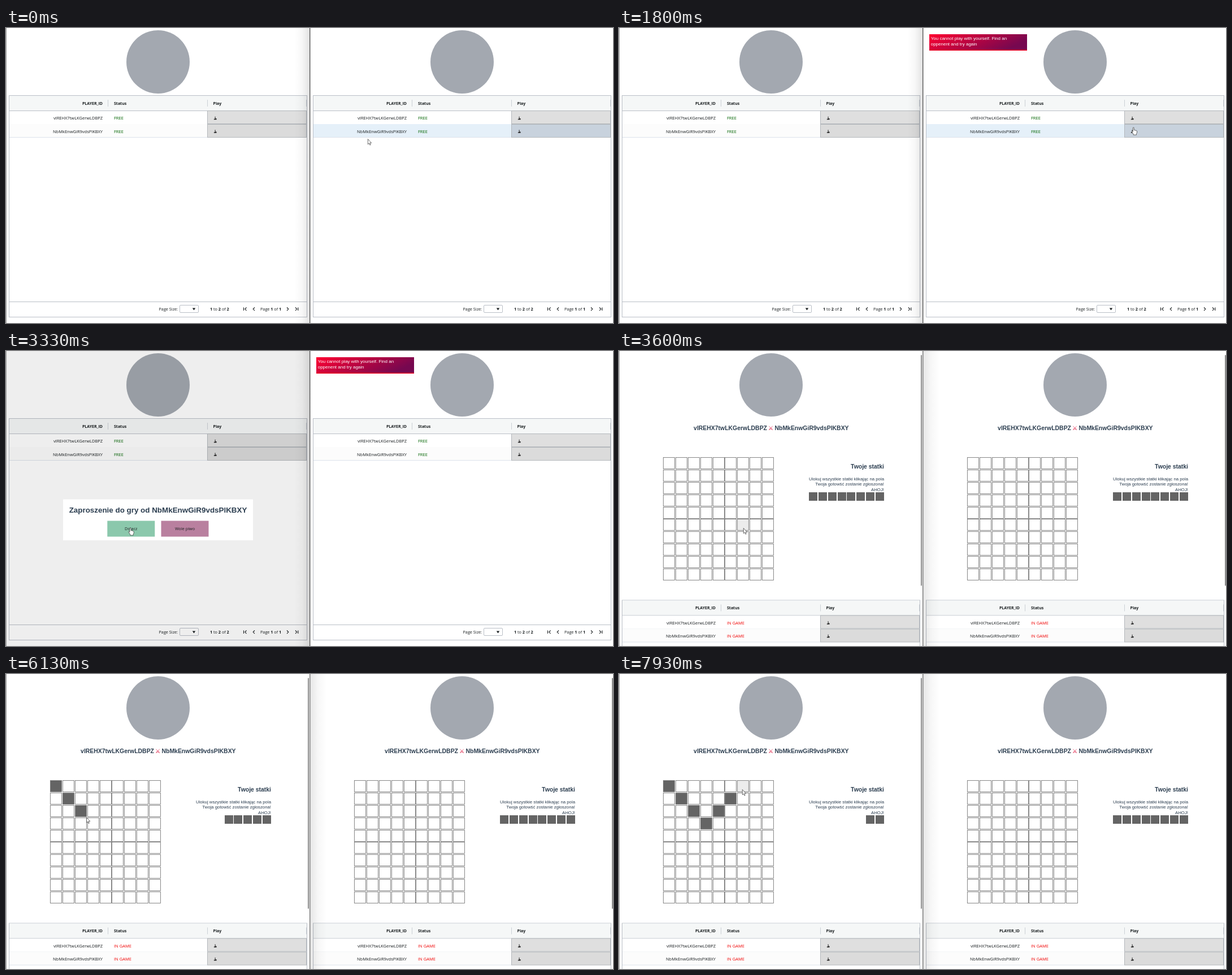
An HTML page for the animation above (8 s loop, 1074x522 px).

```html
<!DOCTYPE html>
<html lang="pl">
<head>
<meta charset="utf-8">
<title>Ships lobby</title>
<style>
html, body { margin: 0; width: 100%; height: 100%; overflow: hidden; background: #fff; }
svg { display: block; }
text { font: 7.25px "Open Sans", "Noto Sans", sans-serif; fill: #181d1f; }
text.id { font-size: 7.5px; }
text.head { font-size: 7px; font-weight: 700; }
text.note, text.toast { font: 7.8px "Liberation Sans", Arial, sans-serif; fill: #2c3e50; }
text.toast { font-size: 8px; fill: #fff; }
text.title { font: bold 10.45px "Liberation Sans", Arial, sans-serif; fill: #2c3e50; }
text.invite { font: bold 13.4px "Liberation Sans", Arial, sans-serif; fill: #2c3e50; }
text.swords { font: 10.45px "DejaVu Sans", sans-serif; fill: #dc143c; }
.end { text-anchor: end; }
.mid { text-anchor: middle; }
.bold { font-weight: 700; }
.line { fill: none; stroke: #babfc7; }
.rule { fill: none; stroke: #dde2eb; }
.icon { fill: none; stroke: #181d1f; stroke-width: 1.1; }
.cell { stroke: #777; stroke-width: .9; }
</style>
</head>
<body>
<svg id="stage" width="1074" height="522" viewBox="0 0 1074 522"></svg>
<script>
const LOOP = 8000, STEP = 1000 / 15, SHIFT = 538;
const PLAYERS = ['vlREHX7twLKGerwLDBPZ', 'NbMkEnwGiR9vdsPlKBXY'];
const COLS = 9, ROWS = 10, PITCH = 21.88, GRID_X = 78, GRID_Y = 188;
const TOAST_AT = 1200, INVITE_AT = 2130, JOIN_HOVER_AT = 3330, GAME_AT = 3600;

// column, row, time of each ship
const SHIPS = [[0, 0, 5130], [1, 1, 5600], [2, 2, 5930], [3, 3, 6460], [4, 2, 6930], [5, 1, 7530]];

// time, x, y of the pointer tip
const PATH = [
  [0, 640, 196], [400, 758, 211], [866, 910, 182], [1733, 910, 182], [1933, 911, 159],
  [2400, 911, 159], [2800, 610, 232], [3200, 206, 316], [3333, 220, 313], [3600, 220, 313],
  [4133, 274, 334], [4600, 111, 240], [4933, 92, 197], [5200, 92, 197], [5530, 109, 218],
  [5660, 110, 219], [5930, 132, 243], [6000, 132, 243], [6130, 142, 253], [6330, 149, 261],
  [6470, 150, 261], [6870, 176, 243], [7000, 177, 242], [7330, 193, 223], [7530, 196, 219],
  [7930, 218, 204], [8000, 218, 204]
];

const rect = (x, y, w, h, fill, extra = '') =>
  `<rect x="${x}" y="${y}" width="${w}" height="${h}" fill="${fill}" ${extra}/>`;
const text = (x, y, s, cls = '', extra = '') => `<text x="${x}" y="${y}" class="${cls}" ${extra}>${s}</text>`;
const path = (d, cls, extra = '') => `<path d="${d}" class="${cls}" ${extra}/>`;
const repeat = (n, f) => Array.from({ length: n }, (_, i) => f(i)).join('');

function row(i) {
  const y = 147 + i * 23, mid = 159.5 + i * 23.5;
  return rect(6, y, 350, 23, i ? '#fcfcfc' : '#fff', `class="row${i}"`) +
    path(`M6 ${y + 23.5}H356`, 'rule') +
    rect(356.5, y - .5 + i, 175, 23, i ? '#dbdbdb' : '#dfdfdf', `class="play${i}" stroke="#b4b8bc"`) +
    text(171, mid + 2.7, PLAYERS[i], 'id end') +
    text(191, mid + 2.7, 'FREE', 'id status') +
    path(`M369.6 ${mid - 2.8}h1v3.3h1.9v2.2h-4.6v-1.4h1.7z`, '', 'fill="#222"');
}

function table() {
  return rect(5.5, 119.5, 527, 392, '#fff', 'class="line" style="fill:#fff"') +
    rect(6, 120, 526, 26.5, '#f5f7f7') +
    path('M6 146.5H532M6 484.5H532', 'line') +
    path('M180.5 127v12M356.5 127v12M531.5 127v12', 'line', 'stroke-opacity=".7"') +
    text(171, 135.7, 'PLAYER_ID', 'head end') + text(191, 135.7, 'Status', 'head') + text(366.5, 135.7, 'Play', 'head') +
    row(0) + row(1) +
    text(270.5, 500.3, 'Page Size:') +
    rect(307.5, 490.5, 33, 13, '#fff', 'class="line" rx="1.5"') +
    path('M329.8 495.5h5.4l-2.7 4z', '', 'fill="#181d1f"') +
    text(361, 500.3, '<tspan class="bold">1</tspan> to <tspan class="bold">2</tspan> of <tspan class="bold">2</tspan>') +
    path('M420.5 494.5v5.5M425.5 494.5l-2.7 2.8 2.7 2.8M440 494.5l-2.8 2.8 2.8 2.8', 'icon') +
    text(450, 500.3, 'Page <tspan class="bold">1</tspan> of <tspan class="bold">1</tspan>') +
    path('M497 494.5l2.8 2.8-2.8 2.8M512 494.5l2.7 2.8-2.7 2.8M516.8 494.5v5.5', 'icon');
}

function cell(i) {
  const x = GRID_X + (i % COLS) * PITCH, y = GRID_Y + Math.floor(i / COLS) * PITCH;
  return rect(Math.round(x) + .4, Math.round(y) + .4, 20, 20, '#fff', 'class="cell"');
}

function game() {
  return text(262, 140, PLAYERS[0], 'title end') + text(264, 140, '⚔\uFE0E', 'swords') +
    text(275.5, 140, PLAYERS[1], 'title') +
    repeat(COLS * ROWS, cell) +
    text(469, 208, 'Twoje statki', 'title end') +
    text(469, 229, 'Ulokuj wszystkie statki klikając na pola', 'note end') +
    text(469, 238.4, 'Twoja gotowść zostanie zgłoszona!', 'note end') +
    text(469, 247.8, 'AHOJ!', 'note end') +
    repeat(8, i => rect(336 + Math.round(i * 16.86), 250, 15, 15, '#646464', 'class="tray"')) +
    rect(534, 7, 2, 408.5, '#8b8b8b', 'rx="1" class="scroll"');
}

const panel = (id, x) => `<g id="${id}" transform="translate(${x})">
  <circle cx="269" cy="60" r="56" fill="#a3a8b0"/>
  <g class="table">${table()}</g><g class="game">${game()}</g></g>`;

const invite = rect(1, 0, 536, 522, '#000', 'opacity=".067"') +
  rect(101, 262.5, 336, 72.5, '#fff') +
  text(269, 286, 'Zaproszenie do gry od ' + PLAYERS[1], 'invite mid') +
  rect(179.3, 300.5, 84, 28, '#80b7a0', 'id="join"') + text(221.3, 317.3, 'Dolacz', 'mid') +
  rect(274.5, 300.5, 84, 28, '#b9809f') + text(316.5, 317.3, 'Wole piwo', 'mid');

const toast = rect(549, 11, 173, 29, 'url(#alert)') + rect(549, 38.5, 173, 1.5, '#ec0626') +
  text(551.7, 21.3, 'You cannot play with yourself. Find an', 'toast') +
  text(551.7, 30.8, 'oppenent and try again', 'toast');

const stops = (a, b) => `<stop stop-color="#000" stop-opacity="${a}"/><stop offset=".5" stop-color="#000" stop-opacity="${(a + b) / 3.5}"/><stop offset="1" stop-color="#000" stop-opacity="${b}"/>`;

const $ = s => document.querySelector(s), $$ = s => [...document.querySelectorAll(s)];
$('#stage').innerHTML = `<defs>
  <linearGradient id="alert" x2="1" y2=".35"><stop stop-color="#ff0030"/><stop offset="1" stop-color="#760850"/></linearGradient>
  <linearGradient id="shadeL">${stops(0, .11)}</linearGradient>
  <linearGradient id="shadeR">${stops(.1, 0)}</linearGradient></defs>` +
  rect(0, 0, 1074, 522, '#fff') + panel('left', 0) + panel('right', SHIFT) +
  `<g id="invite">${invite}</g><g id="toast">${toast}</g>` +
  rect(511, 0, 26, 522, 'url(#shadeL)', 'id="dimL"') + rect(538, 0, 30, 522, 'url(#shadeR)', 'id="dimR"') +
  rect(0, 0, 1, 522, '#a0a0a0') + rect(537, 0, 1.4, 522, '#555', 'id="divider"') +
  `<g id="pointer" fill="#fff" stroke="#222" stroke-width=".65" stroke-linejoin="round">
    <path id="arrow" d="M.3 .5V9.8L2.3 8 3.9 11.2 5.2 10.6 3.8 7.4H6.6Z"/>
    <path id="hand" d="M-1 1a1 1 0 0 1 2 0V4.6l4 .8q1.2.3 1.2 1.5v2.2l-1 2.2v1.8h-5.4v-1.5l-2.8-3.9q-.6-1.2.6-1.4l1.4 1.2z"/>
  </g>`;

const cells = $$('#left .cell'), tray = $$('#left .tray'), status = $$('.status');
const show = (el, on) => { el.style.display = on ? '' : 'none'; };
const paint = (el, color) => el.setAttribute('fill', color);

function slope(i, k) {
  const a = PATH[i - 1], b = PATH[i], c = PATH[i + 1];
  if (!a || !c || (b[k] - a[k]) * (c[k] - b[k]) <= 0) return 0;
  return (c[k] - a[k]) / (c[0] - a[0]);
}

function pointerAt(t) {
  const i = Math.max(0, PATH.findIndex(p => p[0] > t) - 1);
  const a = PATH[i], b = PATH[i + 1], d = b[0] - a[0], u = (t - a[0]) / d, v = 1 - u;
  return [1, 2].map(k => a[k] * v * v * (1 + 2 * u) + b[k] * u * u * (3 - 2 * u) +
    d * u * v * (v * slope(i, k) - u * slope(i + 1, k)));
}

function render(now) {
  // steps land on times rounded to 10 ms, so look slightly ahead
  const t = Math.floor((now % LOOP + 5) / STEP) * STEP;
  const [x, y] = pointerAt(Math.min(t, LOOP - 1));
  const playing = t >= GAME_AT - 1, invited = t >= INVITE_AT && !playing;

  $$('.game').forEach(g => show(g, playing));
  $$('.table').forEach(g => g.setAttribute('transform', `translate(0 ${playing ? 321.5 : 0})`));
  status.forEach(s => {
    s.textContent = playing ? 'IN GAME' : 'FREE';
    s.style.fill = playing ? '#f00000' : '#006400';
  });
  show($('#invite'), invited);
  show($('#toast'), t >= TOAST_AT - 1 && !playing);
  show($('#dimL'), !playing);
  show($('#dimR'), playing);
  paint($('#divider'), playing ? '#777' : '#555');
  paint($('#join'), t >= JOIN_HOVER_AT ? '#8bc8ac' : '#80b7a0');

  const inRight = !playing && x > 543;
  const hot = !inRight || y < 147 || y > 197 ? -1 : y < 170.5 ? 0 : 1;
  [0, 1].forEach(i => {
    paint($('#right .row' + i), i === hot ? '#e5f0f9' : i ? '#fcfcfc' : '#fff');
    paint($('#right .play' + i), i === hot ? '#c8d2dd' : i ? '#dbdbdb' : '#dfdfdf');
  });

  const col = Math.floor((x - GRID_X) / PITCH), line = Math.floor((y - GRID_Y) / PITCH);
  cells.forEach((c, i) => paint(c, i === line * COLS + col && col >= 0 && col < COLS ? '#ececec' : '#fff'));
  SHIPS.forEach(([c, r, at]) => t >= at && paint(cells[r * COLS + c], '#646464'));
  const used = SHIPS.filter(s => t >= s[2] + 60).length;
  tray.forEach((b, i) => show(b, i >= used));
  $('#right .scroll').style.opacity = Math.max(0, Math.min(1, (6730 - t) / 270));

  const onButton = invited && x > 179 && x < 263 && y > 300 && y < 329;
  const hand = (hot >= 0 && x > 894) || onButton;
  show($('#hand'), hand);
  show($('#arrow'), !hand);
  $('#pointer').setAttribute('transform', `translate(${x.toFixed(1)} ${y.toFixed(1)})`);
}

function tick() {
  render(performance.now());
  requestAnimationFrame(tick);
}
tick();
</script>
</body>
</html>
```
